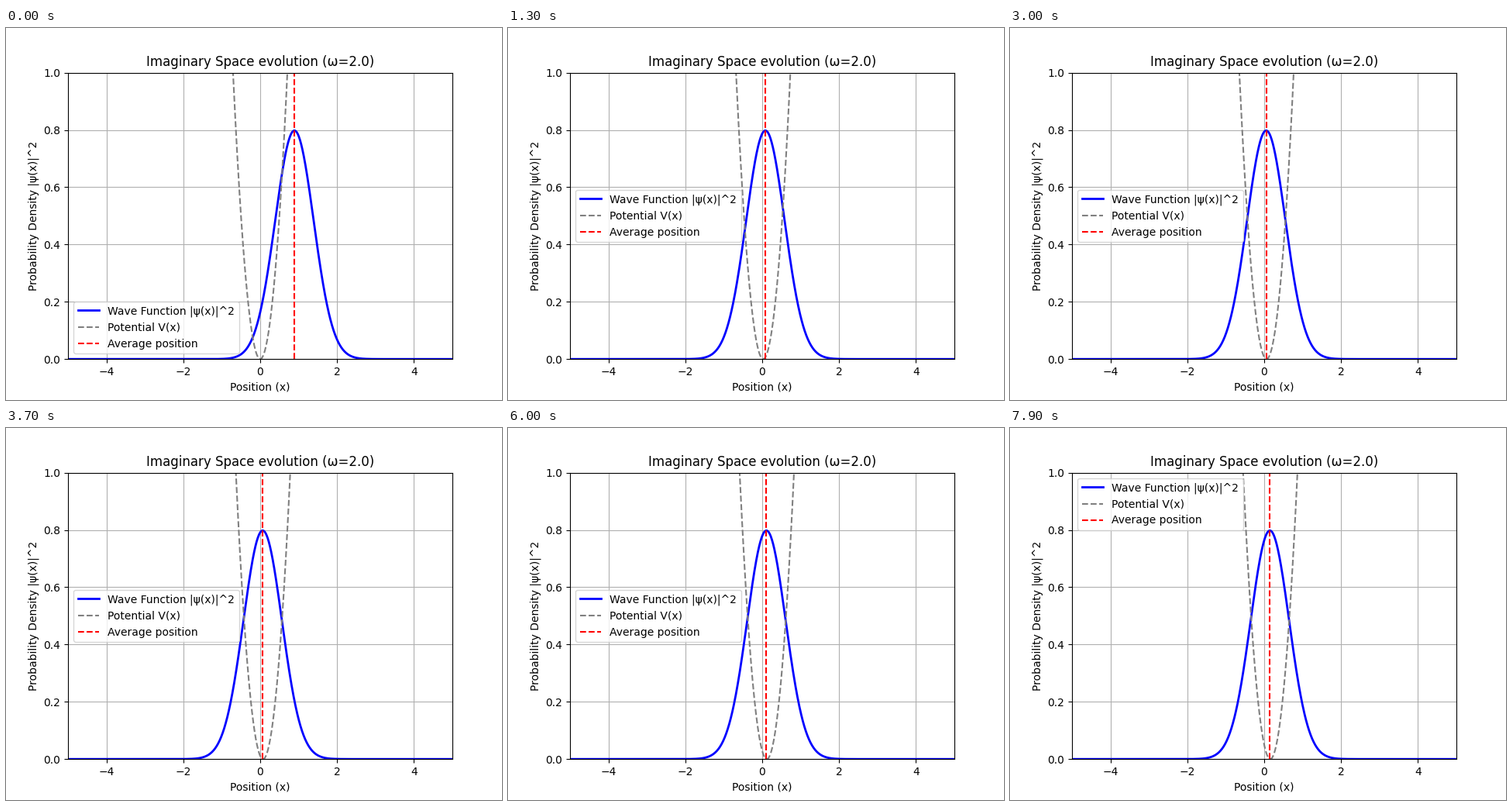
Write a matplotlib script that moves like this. It is 640 px wide and 480 px high and loops after 8000 ms.

```python
import numpy as np
import matplotlib.pyplot as plt
from matplotlib.animation import FuncAnimation

FRAMES = 80
OMEGA = 2.0
DTAU = 0.1        # imaginary time per frame
DRIFT = 0.02      # speed of the trap centre
START = 0.89      # initial mean position

x = np.linspace(-5, 5, 1000)


def trap_center(tau):
    return DRIFT * tau


def mean_position(tau):
    """Solution of dm/dtau = -omega * (m - center)."""
    lag = DRIFT / OMEGA
    return trap_center(tau) - lag + (START + lag) * np.exp(-OMEGA * tau)


def density(m):
    return np.sqrt(OMEGA / np.pi) * np.exp(-OMEGA * (x - m) ** 2)


def potential(c):
    return 0.5 * OMEGA**2 * (x - c) ** 2


fig, ax = plt.subplots(figsize=(6.4, 4.8), dpi=100)
wave, = ax.plot(x, density(START), color="blue", lw=2,
                label="Wave Function |ψ(x)|^2")
well, = ax.plot(x, potential(0), color="gray", ls="--", label="Potential V(x)")
mean = ax.axvline(START, color="red", ls="--", label="Average position")
ax.set(xlim=(-5, 5), ylim=(0, 1), xlabel="Position (x)",
       ylabel="Probability Density |ψ(x)|^2",
       title=f"Imaginary Space evolution (ω={OMEGA})")
ax.grid(True)
ax.legend(loc="best")


def update(i):
    tau = i * DTAU * 1.0
    m = mean_position(tau)
    wave.set_ydata(density(m))
    well.set_ydata(potential(trap_center(tau)))
    mean.set_xdata([m, m])
    return wave, well, mean


anim = FuncAnimation(fig, update, frames=FRAMES, interval=100, repeat=True,
                     repeat_delay=0, blit=False)
plt.show()
```
